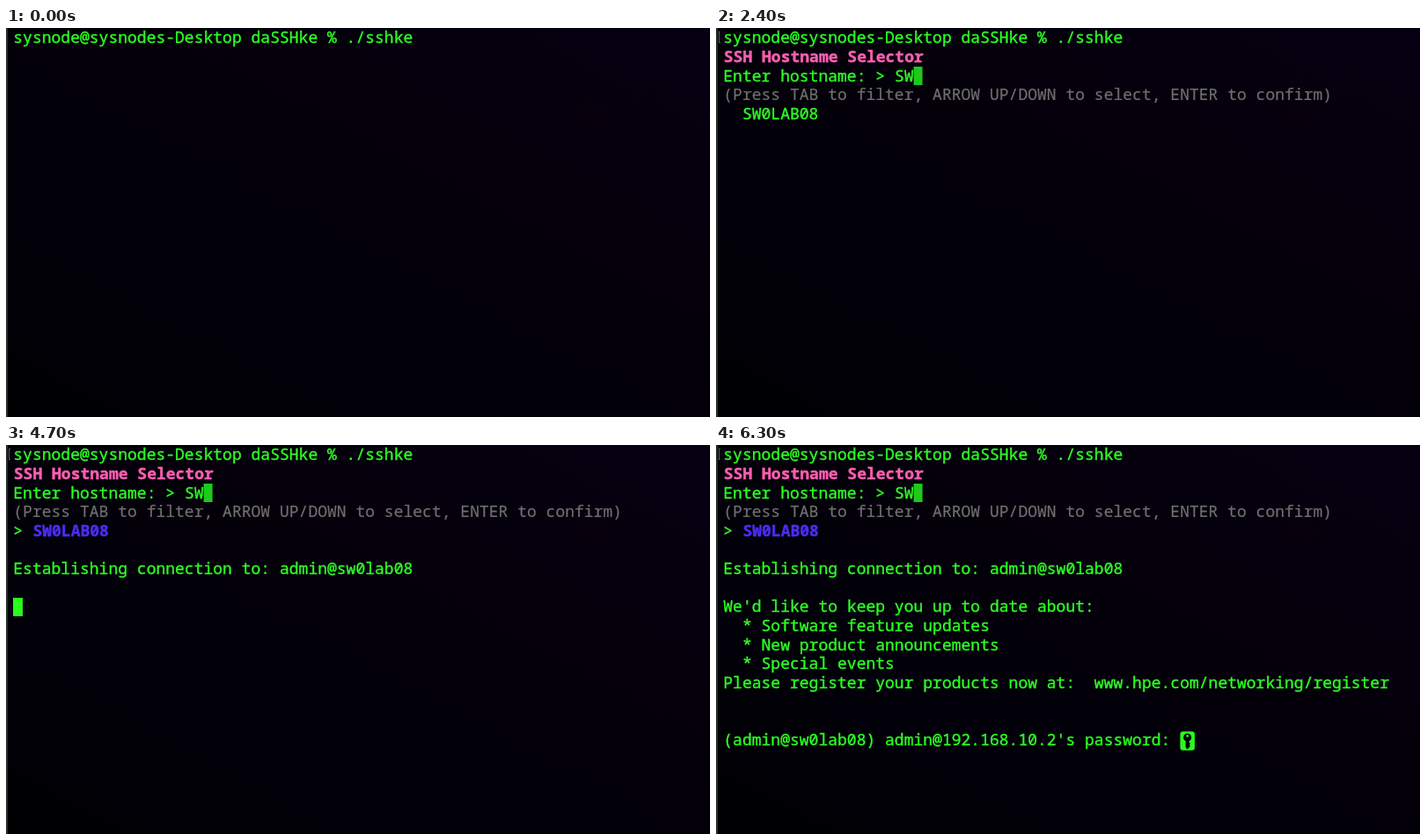
Animation of 800x443 px, one loop 6.4 s. Source, as an HTML page:

```html
<!DOCTYPE html>
<html lang="en">
<head>
<meta charset="utf-8">
<title>SSH hostname selector</title>
<style>
  :root { --line: 21.66px; --loop: 6.4s; }
  html, body { margin: 0; width: 100%; height: 100%; overflow: hidden; background: #010008; }
  .screen {
    position: relative; width: 800px; height: 443px; overflow: hidden;
    font: 18.02px "Noto Sans Mono", "DejaVu Sans Mono", monospace;
    color: #2dff22;
    background:
      radial-gradient(ellipse 40px 35px at 665px 100px, #14000633, #0000),
      linear-gradient(28deg, #000003 0%, #010009 30%, #04000a 60%, #05000e 82%, #070012 100%);
  }
  .screen::before {
    content: ""; position: absolute; left: 0; top: 0; width: 1.5px; height: 100%;
    background: #2b302d;
  }
  pre, .block, .mark, .key { position: absolute; margin: 0; }
  pre {
    left: 8.3px; top: calc(var(--r) * var(--line) + .2px);
    font: inherit; line-height: var(--line); white-space: pre;
    -webkit-text-stroke: .4px;
  }
  .block {
    left: calc(8.3px + var(--c, 0) * 1ch); top: calc(var(--r) * var(--line) + .5px);
    width: 10.6px; height: 21.3px; background: #28fb1c;
  }
  .input { background: #1fc91c; }
  .mark {
    left: 3px; top: 4px; width: 2px; height: 13px;
    border: 1px solid #5a5a5a; border-right: 0; box-sizing: border-box;
  }
  .title { left: 8.8px; color: #ff5fb2; font-weight: 700; }
  .hint { color: #6f6f6f; -webkit-text-stroke-width: .2px; }
  .picked b { position: relative; left: .5px; color: #4c2cf2; font-weight: 700; }
  .key { left: 527px; top: 325.5px; }

  /* Hard cuts on one shared clock */
  .menu, .all, .s, .w, .input, .match, .picked, .connect, .wait, .banner {
    animation: var(--loop) step-end infinite;
  }
  .menu    { animation-name: menu; }
  .all     { animation-name: all; }
  .s       { animation-name: s; }
  .w       { animation-name: w; }
  .input   { animation-name: input; }
  .match   { animation-name: match; }
  .picked  { animation-name: picked; }
  .connect { animation-name: connect; }
  .wait    { animation-name: wait; }
  .banner  { animation-name: banner; }
  @keyframes menu    { 0% { opacity: 0 } 6.25%, 100% { opacity: 1 } }
  @keyframes all     { 0% { opacity: 0 } 6.25% { opacity: 1 } 29.6875%, 100% { opacity: 0 } }
  @keyframes s       { 0% { opacity: 0 } 17.1875%, 100% { opacity: 1 } }
  @keyframes w       { 0% { opacity: 0 } 20.3125%, 100% { opacity: 1 } }
  @keyframes input   { 0% { transform: none } 17.1875% { transform: translateX(1ch) } 20.3125%, 100% { transform: translateX(2ch) } }
  @keyframes match   { 0% { opacity: 0 } 29.6875% { opacity: 1 } 42.1875%, 100% { opacity: 0 } }
  @keyframes picked  { 0% { opacity: 0 } 42.1875%, 100% { opacity: 1 } }
  @keyframes connect { 0% { opacity: 0 } 54.6875%, 100% { opacity: 1 } }
  @keyframes wait    { 0% { opacity: 0 } 54.6875% { opacity: 1 } 82.8125%, 100% { opacity: 0 } }
  @keyframes banner  { 0% { opacity: 0 } 82.8125%, 100% { opacity: 1 } }
</style>
</head>
<body>
<div class="screen">
  <pre style="--r:0">sysnode@sysnodes-Desktop daSSHke % ./sshke</pre>

  <div class="menu">
    <div class="mark"></div>
    <pre class="title" style="--r:1">SSH Hostname Selector</pre>
    <pre style="--r:2">Enter hostname: &gt; <span class="s">S</span><span class="w">W</span></pre>
    <div class="block input" style="--r:2;--c:18"></div>
    <pre class="hint" style="--r:3">(Press TAB to filter, ARROW UP/DOWN to select, ENTER to confirm)</pre>
  </div>

  <pre class="all" style="--r:4">  SW0LAB08
  SW2LAB08
  ARB01APLAB08
  pve
  pve2
  uranus
  thalia
  euterpe
  erato
  zeus
  triton
  rabbit
  bal</pre>
  <pre class="match" style="--r:4">  SW0LAB08</pre>
  <pre class="picked" style="--r:4">&gt; <b>SW0LAB08</b></pre>

  <pre class="connect" style="--r:6">Establishing connection to: admin@sw0lab08</pre>
  <div class="block wait" style="--r:8"></div>

  <div class="banner">
    <pre style="--r:8">We'd like to keep you up to date about:
  * Software feature updates
  * New product announcements
  * Special events
Please register your products now at:  www.hpe.com/networking/register


(admin@sw0lab08) admin@192.168.10.2's password:</pre>
    <svg class="key" width="18" height="22" viewBox="0 0 18 22">
      <rect x=".5" y=".2" width="16.5" height="21.5" rx="3" fill="#28fb1c"/>
      <path d="M8.7 2.4a4.6 4.6 0 0 1 2 8.7v1.8l1.5 1.4-1.5 1.4 1.3 1.3-1.3 1.3v.3l-2 1.8-2-1.8v-7.5A4.6 4.6 0 0 1 8.7 2.4z" fill="#010006"/>
      <circle cx="8.7" cy="5.4" r="1.4" fill="#28fb1c"/>
    </svg>
  </div>
</div>
</body>
</html>
```
